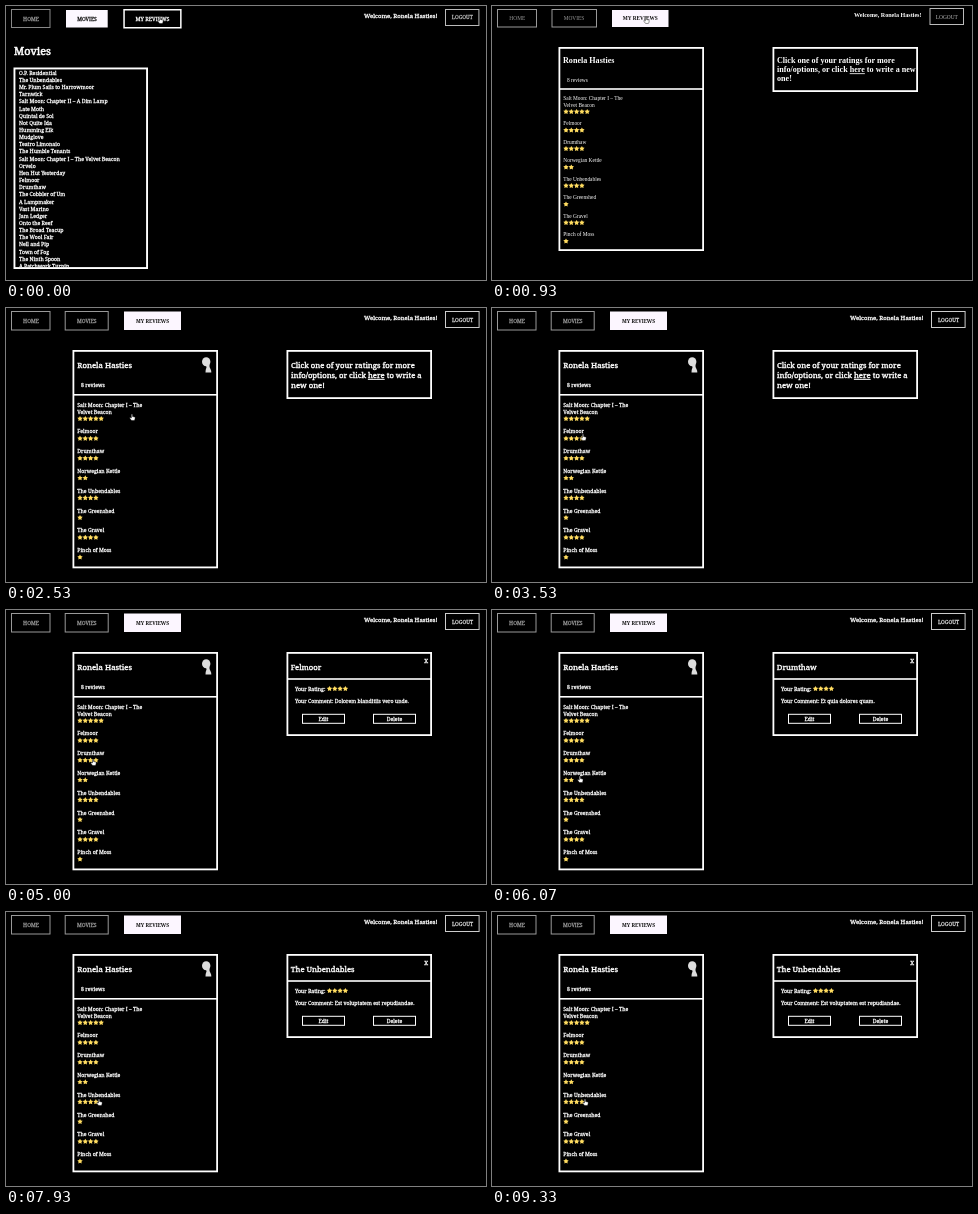
Animation of 480x274 px, one loop 9.79 s. Source, as an HTML page:

```html
<!DOCTYPE html>
<html lang="en">
<head>
<meta charset="utf-8">
<title>My reviews</title>
<style>
  html, body { margin: 0; width: 100%; height: 100%; overflow: hidden; background: #000; }
  svg { display: block; width: 100vw; height: 100vh; fill: #fff; }
  text { white-space: pre; stroke-width: 0; }
  .slab { font-family: "Noto Serif", serif; }
  .slab text { stroke-width: .05em; }
  .times { font-family: "Liberation Serif", serif; }
  .bold { font-weight: 700; }
  .mid { text-anchor: middle; }
</style>
</head>
<body>
<script>
const LOOP = 9790;
const USER = 'Ronela Hasties';

const MOVIES = ['O.P. Residential', 'The Unbendables', 'Mr. Plum Sails to Harrowmoor', 'Tarnwick',
  'Salt Moon: Chapter II – A Dim Lamp', 'Late Moth', 'Quintal de Sol', 'Not Quite Ida', 'Humming Elk',
  'Mudglove', 'Teatro Limonaio', 'The Humble Tenants', 'Salt Moon: Chapter I – The Velvet Beacon',
  'Orvelo', 'Hen Hut Yesterday', 'Felmoor', 'Drumthaw', 'The Cobbler of Um', 'A Lampmaker',
  'Vast Marino', 'Jam Ledger', 'Onto the Reef', 'The Broad Teacup', 'The Wool Fair', 'Nell and Pip',
  'Town of Fog', 'The Ninth Spoon', 'A Patchwork Turnip'];

const REVIEWS = [['Felmoor', 4], ['Drumthaw', 4], ['Norwegian Kettle', 2], ['The Unbendables', 4],
  ['The Greenshed', 1], ['The Gravel', 4], ['Pinch of Moss', 1]];

// start time, title, stars, comment
const DETAILS = [
  [4130, 'Felmoor', 4, 'Dolorem blanditiis vero unde.'],
  [5200, 'Drumthaw', 4, 'Et quia dolores quam.'],
  [6270, 'Norwegian Kettle', 2, 'Est eveniet corporis omnis.'],
  [7870, 'The Unbendables', 4, 'Est voluptatem est repudiandae.']
];

// time, x, y of the fingertip
const PATH = [[0, 154, 11], [1600, 154, 11], [1740, 94, 145], [1870, 153, 111], [2270, 153, 111],
  [2530, 126, 106], [2730, 115, 107], [3000, 115, 107], [3270, 85, 183], [3530, 91, 126],
  [4730, 91, 126], [5000, 87, 149], [5730, 87, 149], [6130, 88, 169], [6870, 88, 169],
  [7130, 85, 198], [7470, 85, 198], [7800, 93, 187], [LOOP, 93, 187]];

const CLICKS = [[730, 930], [4070, 4200], [5130, 5330], [6200, 6400], [7800, 7930]];

const text = (x, y, s, size, cls = '', fill = '#fff') =>
  `<text x="${x}" y="${y}" font-size="${size}" class="${cls}" fill="${fill}" stroke="${fill}">${s}</text>`;

// outer edges, line drawn inside them
const box = (x1, y1, x2, y2, w = 1, color = '#fff') =>
  `<rect x="${x1 + w / 2}" y="${y1 + w / 2}" width="${x2 - x1 - w}" height="${y2 - y1 - w}"
    fill="none" stroke="${color}" stroke-width="${w}"/>`;

const fillBox = (x1, y1, x2, y2, fill) =>
  `<rect x="${x1}" y="${y1}" width="${x2 - x1}" height="${y2 - y1}" fill="${fill}"/>`;

const star = (cx, cy) => {
  const pts = Array.from({ length: 10 }, (_, i) => {
    const r = i % 2 ? 1.5 : 2.8, a = (i / 5 - 0.5) * Math.PI;
    return (cx + r * Math.cos(a)).toFixed(2) + ',' + (cy + r * Math.sin(a)).toFixed(2);
  });
  return `<polygon points="${pts.join(' ')}" fill="#ffdc60"/>`;
};
const stars = (x, y, n) => Array.from({ length: n }, (_, i) => star(x + 2.7 + i * 5.3, y)).join('');

const group = (id, cls, ...parts) => `<g id="${id}" class="${cls}">${parts.join('')}</g>`;

const moviesPage = () => group('movies', 'slab',
  box(5, 3, 44.5, 22, 1, '#888'), text(25, 14.7, 'HOME', 5.1, 'mid', '#999'),
  fillBox(60, 4, 101.7, 21.5, '#fcf8ff'), text(81, 14.7, 'MOVIES', 5.1, 'mid', '#111'),
  box(117.3, 3, 175.6, 22.5, 1.5), text(146.5, 14.7, 'MY REVIEWS', 5.4, 'mid'),
  text(358, 12, `Welcome, ${USER}!`, 6),
  box(439, 3, 473.4, 20, 1, '#bbb'), text(456.3, 13.3, 'LOGOUT', 5.1, 'mid', '#bbb'),
  text(8, 48.8, 'Movies', 10.9),
  '<clipPath id="list"><rect x="9" y="63" width="131" height="198"/></clipPath><g clip-path="url(#list)">',
  ...MOVIES.map((m, i) => text(13, 68.8 + i * 7.15, m, 5.2)),
  '</g>', box(7.5, 61.5, 142, 263, 1.9));

const reviewsList = (x, y, step, gap, size) =>
  text(x, y, 'Salt Moon: Chapter I – The', size) + text(x, y + 7, 'Velvet Beacon', size) +
  stars(x, y + 7 + gap, 5) +
  REVIEWS.map(([name, n], i) => {
    const ry = y + 7 + step * (i + 1);
    return text(x, ry, name, size) + stars(x, ry + gap, n);
  }).join('');

const plainPage = () => group('plain', 'times',
  box(5, 3, 45, 21.5, 1, '#999'), text(25.3, 14, 'HOME', 5.4, 'mid', '#999'),
  box(59.5, 3, 105, 21.5, 1, '#999'), text(82, 14, 'MOVIES', 5.4, 'mid', '#999'),
  fillBox(120, 4, 176.5, 21, '#fcf6ff'), text(148.3, 14, 'MY REVIEWS', 5.3, 'mid bold', '#111'),
  text(362, 11, `Welcome, ${USER}!`, 6.1, 'bold'),
  box(437.5, 2, 472, 19, 1, '#bbb'), text(454.8, 12.5, 'LOGOUT', 5.4, 'mid', '#bbb'),
  box(66.5, 41, 212, 245, 1.8), fillBox(67, 82.2, 211, 83.8, '#fff'),
  text(71, 57, USER, 8.1, 'bold'), text(75, 75.6, '8 reviews', 5.4),
  reviewsList(71.3, 93.7, 18.5, 5, 5.4),
  box(280.5, 41, 426, 86, 1.8),
  text(285, 57.2, 'Click one of your ratings for more', 8.1, 'bold'),
  text(285, 66.3, 'info/options, or click <tspan text-decoration="underline">here</tspan> to write a new', 8.1, 'bold'),
  text(285, 75.4, 'one!', 8.1, 'bold'));

const reviewsPage = () => group('reviews', 'slab',
  box(5, 3, 44.5, 22.5, 1, '#999'), text(25, 14.8, 'HOME', 5.1, 'mid', '#999'),
  box(58.7, 3, 102.7, 22.5, 1, '#999'), text(80.8, 14.8, 'MOVIES', 5.1, 'mid', '#999'),
  fillBox(118, 3.5, 175, 22, '#fcf6ff'),
  '<text id="tab" class="mid" x="146.5" y="14.8" fill="#111">MY REVIEWS</text>',
  text(358, 12, `Welcome, ${USER}!`, 6),
  box(439, 3, 473.6, 20, 1, '#ccc'), text(456.5, 13.5, 'LOGOUT', 5.1, 'mid', '#ddd'),
  box(66.5, 42, 212, 260.3, 1.8), fillBox(67, 86, 211, 87.6, '#fff'),
  text(71.3, 59.5, USER, 7.8), text(75, 78.9, '8 reviews', 5.2),
  '<g id="avatar" fill="#ddd"><ellipse cx="200.2" cy="53.7" rx="4.2" ry="4.5"/>',
  '<path d="M199.500 64.500q0-3 1-5l-.5-2.500 3.500-1q-.5 4 1.200 5.500q.7 1 .6 3z"/></g>',
  reviewsList(71.3, 98.6, 19.8, 5.1, 5.2));

const promptPanel = () => group('prompt', 'slab',
  box(280.5, 42, 426, 91, 1.8),
  text(285, 59.6, 'Click one of your ratings for more', 7.7),
  text(285, 70, 'info/options, or click <tspan text-decoration="underline">here</tspan> to write a', 7.7),
  text(285, 80.3, 'new one!', 7.7));

const detailPanel = ([, title, n, comment], i) => group('detail' + i, 'slab',
  box(280.5, 42, 426, 126, 1.8), fillBox(281, 68.2, 425, 69.8, '#fff'),
  text(284.8, 59.7, title, 7.7),
  text(420.2, 53, 'X', 5.8, 'mid'),
  text(289, 80.8, 'Your Rating:', 5.2), stars(320.8, 78.8, n),
  text(289, 93.4, 'Your Comment: ' + comment, 5.2),
  box(296, 103.8, 339, 113.8), text(317.5, 110.7, 'Edit', 5.2, 'mid'),
  box(367, 103.8, 410, 113.8), text(388.5, 110.7, 'Delete', 5.2, 'mid'));

document.body.innerHTML = `<svg viewBox="0 0 480 274" preserveAspectRatio="none">
  <rect width="480" height="274" fill="#000"/>
  ${moviesPage()}${plainPage()}${reviewsPage()}${promptPanel()}${DETAILS.map(detailPanel).join('')}
  <g id="cursor">
    <circle id="ripple" r="11" fill="#999" opacity=".35"/>
    <path d="M-.7.5q.7-.9 1.4 0v2.5l2.4.5q.9.3.7 1.2l-.5 2.2q-.2.7-.8.7h-2.6q-.6 0-.9-.5l-1.7-2.4q0-.9.9-.5l1.1.5z"
      transform="scale(.85)" stroke="#000" stroke-width=".5"/>
  </g></svg>`;

const el = id => document.getElementById(id);
const show = (id, on) => { el(id).style.display = on ? '' : 'none'; };

function pointer(t) {
  const i = PATH.findIndex(p => p[0] > t);
  const [t0, x0, y0] = PATH[i - 1], [t1, x1, y1] = PATH[i];
  const k = (t - t0) / (t1 - t0);
  return [x0 + (x1 - x0) * k, y0 + (y1 - y0) * k];
}

function draw(t) {
  show('movies', t < 930);
  show('plain', t >= 930 && t < 1000);
  show('reviews', t >= 1000);
  show('prompt', t >= 1000 && t < DETAILS[0][0]);
  show('avatar', t >= 1670);
  DETAILS.forEach((d, i) => show('detail' + i, t >= d[0] && t < (DETAILS[i + 1] || [LOOP])[0]));
  el('tab').setAttribute('font-weight', t < 1200 ? 400 : 700);
  el('tab').setAttribute('font-size', t < 1200 ? 5.4 : 5);
  show('ripple', CLICKS.some(([a, b]) => t >= a && t < b));
  el('cursor').setAttribute('transform', `translate(${pointer(t)})`);
}

const start = performance.now();
function tick() {
  draw((performance.now() - start) % LOOP);
  requestAnimationFrame(tick);
}
tick();
</script>
</body>
</html>
```
